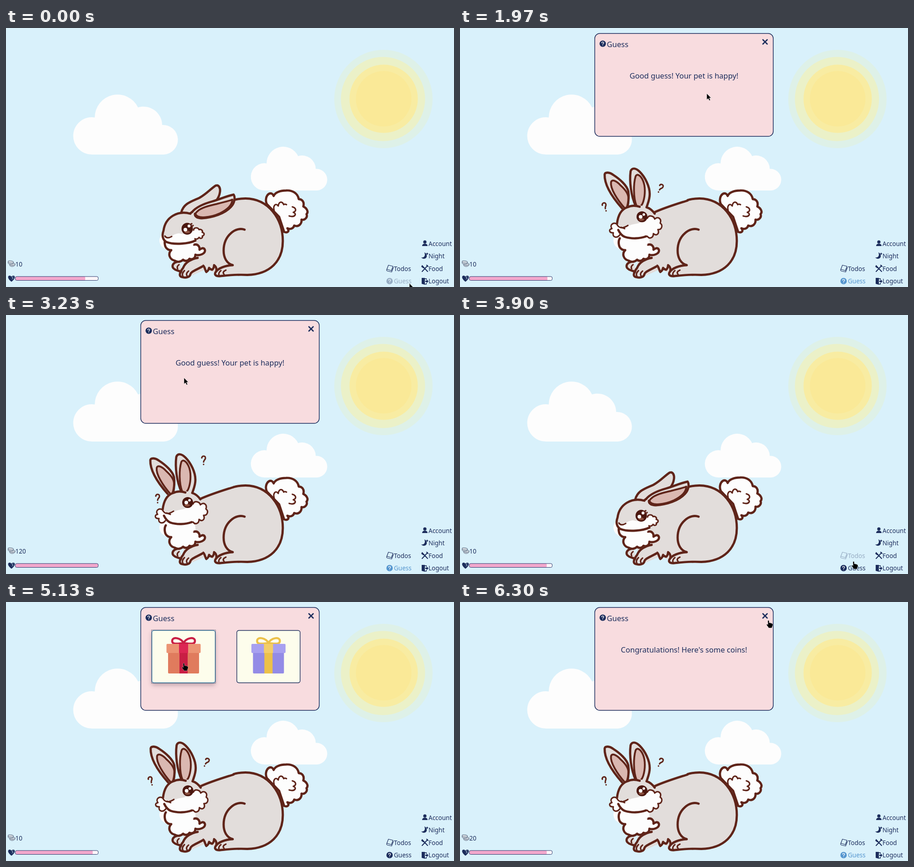
An HTML page that plays this animation: 984 by 569 pixels, repeating every 6.33 s.

```html
<!DOCTYPE html>
<html lang="en">
<head>
<meta charset="utf-8">
<title>Pet rabbit</title>
<style>
html, body { margin: 0; height: 100%; overflow: hidden; background: #d9f1fb; }
svg { display: block; width: 100vw; height: 100vh; }
text { font: 13.5px "Noto Sans", "Open Sans", sans-serif; fill: #1c2d5c; }
.big { font-size: 16.5px; }
.navy { fill: #1c2d5c; }
.line { fill: none; stroke: #1c2d5c; stroke-width: 1.5; stroke-linecap: round; stroke-linejoin: round; }
.pet path, #ask { fill: none; stroke: #5f2419; stroke-width: 4.9; stroke-linecap: round; stroke-linejoin: round; }
.pet .thin, #ask { stroke-width: 3.2; }
.pet .gray { fill: #e2dddb; }
.pet .white { fill: #fdfdfd; }
.pet .pink { fill: #dab8b1; stroke-width: 4; }
.pet .bare { stroke: none; }
.eye { fill: #4b170f; }
.spark { fill: #fdfdfd; }
.focus { fill: none; stroke: #59647c; stroke-width: .7; }
</style>
</head>
<body>
<svg viewBox="0 0 984 569" preserveAspectRatio="none">
  <defs>
    <path id="cloud" fill="#fdfdfd" d="M189 278a41 41 0 1 1 6-81.500a50 50 0 0 1 95-22a41 41 0 0 1 53 38.500a32.500 32.500 0 0 1 4 65z"/>
    <g id="badge">
      <circle r="7"/>
      <path d="M-2.200 -1.700C-2.200 -4.600 2.400 -4.600 2.200 -1.700C2 0 0 0 0 1.600M0 3.900v.1" fill="none" stroke="#fff" stroke-width="1.400" stroke-linecap="round"/>
    </g>
    <path id="ask" d="M-4 -5C-4 -10.500 5 -10.500 4 -4C3 0 0 0 0 4M0 9v.3"/>
    <filter id="shade" x="-20%" y="-20%" width="140%" height="150%">
      <feDropShadow dx="0" dy="5" stdDeviation="5" flood-color="#604050" flood-opacity=".35"/>
    </filter>
  </defs>

  <rect width="984" height="569" fill="#d9f1fb"/>
  <circle cx="829" cy="156" r="108" fill="#def1e8"/>
  <circle cx="828" cy="156" r="92.500" fill="#ebf1c8"/>
  <circle cx="829.500" cy="155.500" r="75" fill="#f8eca2"/>
  <circle cx="829.500" cy="155.500" r="61" fill="#fae997"/>
  <use href="#cloud"/>
  <use href="#cloud" transform="translate(430 154) scale(.73)"/>

  <g class="pet">
    <g id="tail">
      <path class="white" d="M573 387C569 379 571 368 578 364C582 362 586 364 588 369C591 361 603 357 615 357C629 356 641 363 643 376C650 376 656 382 653 392C661 396 665 404 660 409C663 415 657 423 649 421C650 430 643 438 633 434C631 441 624 443 618 440C623 446 619 451 611 448L600 415Z"/>
      <path class="thin" d="M589 401C586 391 592 383 598 391C599 382 606 379 610 388C612 386 614 387 616 388M629 393C637 395 639 402 631 405C639 407 636 417 622 413"/>
    </g>
    <ellipse cx="361" cy="467" rx="24" ry="21" fill="#fdfdfd"/>
    <path class="gray bare" d="M405 407C455 391 490 377 525 374C575 372 608 420 608 468C608 510 580 543 530 543C505 541 485 543 470 545L459 538L440 530L405 545L390 520L385 465Z"/>
    <path id="neck" d="M427 404C451 393 475 386 500 378"/>
    <path d="M500 378C510 375 518 374.500 526 374.500C577 375 608 420 608 468C608 512 580 541 530 542.500C505 541 490 543 471 545C462 546 457 543 460 537C466 527 482 522 498 521C486 518 478 506 478 489C478 455 506 436 524 443"/>
    <path class="thin" d="M470 545C465 542 468 536 472 533M479 541C475 538 478 534 483 532"/>
    <path d="M433 522C437 525 437 532 440 536C444 534 445 531 446 527C449 530 451 531 453 531C456 528 457 525 457 521C461 524 463 528 462 533"/>
    <path class="gray" d="M382 513C370 513 363 520 367 527C371 533 380 533 386 536"/>
    <path class="thin" d="M377 529C375 525 377 522 380 520"/>
    <path class="white bare" d="M351 470L408 455C417 460 418 470 414 478Z"/>
    <path class="white" d="M351 462C347 468 348 481 354 485C357 488 360 488 363 488C355 496 359 508 370 511C377 515 384 514 389 509C393 513 400 512 403 507C409 510 416 506 416 498C425 501 438 496 437 488C435 481 429 484 425 487C426 480 421 474 413 476"/>
    <path class="white bare" d="M356 466L410 462L412 476L355 480Z"/>
    <path class="gray bare" d="M420 508L402 514L390 527L383 547L405 542L434 522Z"/>
    <path d="M421 505C408 507 394 514 389 527C383 535 378 545 386 547C395 550 404 547 405 541C407 535 415 533 433 523"/>
    <path class="thin" d="M389 546C386 542 388 537 392 533M398 545C395 541 397 537 401 534"/>

    <g id="calm">
      <path class="gray" d="M385 405C390 386 405 382 425 373C440 365 452 351 461 346C468 344 471 352 470 360C468 375 458 386 445 390C428 396 412 399 403 409"/>
      <path class="gray bare" d="M407 408C380 398 350 415 346 445C342 456 344 465 352 470C370 477 402 474 416 467L432 458L440 430Z"/>
      <path class="white bare" d="M349 461C362 462 366 452 380 451C394 455 404 451 412 443L426 442L433 450L433 459L416 467C398 474 365 476 352 469Z"/>
      <path d="M405 408C378 400 350 415 346 445C342 456 344 465 352 470C370 477 402 474 416 467"/>
      <path class="thin white" d="M412 444C413 437 422 438 424 443C428 441 433 445 431 449C437 450 436 456 431 457C433 462 427 464 424 460C421 465 416 464 415 463"/>
      <path class="thin" d="M349 457C353 463 359 461 364 458"/>
      <ellipse class="eye" cx="398" cy="441" rx="12.500" ry="13"/>
      <path class="thin" d="M404 432L408 430M408 436L411 434"/>
      <ellipse cx="398" cy="448" rx="6" ry="3" fill="#8c5140"/>
      <circle class="spark" cx="402" cy="435" r="3.200"/>
      <circle class="spark" cx="394" cy="443" r="4"/>
      <path class="gray" d="M409 404C418 393 435 386 453 381C470 376 485 369 500 366C504 372 502 385 494 393C480 408 455 416 430 418C420 418 414 414 415 408"/>
      <path class="pink" d="M416 408C423 395 445 391 465 386C480 382 490 380 497 377C497 388 488 398 470 407C450 416 420 421 416 408Z"/>
    </g>

    <g id="curious">
      <path class="gray" d="M355 393C340 376 316 345 317 319C318 313 328 314 336 320C350 329 366 343 369 356C371 370 369 382 367 392"/>
      <path class="pink" d="M361 393C345 375 329 350 331 336C333 328 344 334 352 343C362 352 369 362 369 370C369 380 367 388 365 393"/>
      <path class="gray" d="M385 388C375 365 371 335 374 312C377 303 386 305 394 313C406 325 416 345 416 362C416 375 411 384 409 392"/>
      <path class="pink" d="M387 388C380 370 380 340 385 323C388 316 396 321 401 332C407 345 406 365 402 378C400 385 396 390 393 390"/>
      <path class="gray bare" d="M344 432C345 412 350 398 366 391C380 384 396 385 410 392L428 405L432 440L405 458L350 452Z"/>
      <path d="M344 428C346 410 352 396 367 391C375 387 385 387 394 390M409 391C416 393 422 398 427 405"/>
      <path class="white bare" d="M344 428L352 433C364 436 370 430 382 428C394 427 405 420 412 413L428 415L441 428L432 448L408 457C390 464 362 461 349 453L333 447L333 433Z"/>
      <path class="thin white" d="M344 428C336 423 327 430 333 438C325 439 327 448 336 447C333 457 344 460 350 452"/>
      <path class="thin white" d="M411 415C414 407 425 410 427 417C433 410 443 416 439 426C446 431 442 441 434 440C438 449 431 455 424 449C424 459 415 461 411 455"/>
      <path d="M347 441C350 447 354 453 361 456C376 461 394 460 408 455"/>
      <path class="thin" d="M344 429C350 439 358 437 368 431M353 435L361 438"/>
      <ellipse class="eye" cx="399" cy="412" rx="12" ry="12"/>
      <ellipse cx="398" cy="418" rx="6" ry="2.800" fill="#8c5140"/>
      <circle class="spark" cx="403" cy="407" r="2.800"/>
      <circle class="spark" cx="396" cy="412" r="4"/>
    </g>
    <g id="asks"><use href="#ask" id="ask1"/><use href="#ask" id="ask2"/></g>
  </g>

  <!-- Status -->
  <g fill="#cfd6dc" stroke="#62738b">
    <path d="M8 519v3c3 3 9 3 12-1v-3z"/>
    <ellipse cx="14" cy="519" rx="6" ry="2.600"/>
    <path d="M4.500 514v3c3 3 9 3 12 0v-3z"/>
    <ellipse cx="10.500" cy="514" rx="6" ry="2.600" transform="rotate(8 10.500 514)"/>
  </g>
  <text id="coins" x="20.500" y="524"></text>
  <path class="navy" d="M12 557.500C3 551 3 544 8 544C10 544 11 545 12 546.500C13 545 14 544 16 544C21 544 21 551 12 557.500Z"/>
  <path d="M16 545l-3 3.500l3 1l-3 3" fill="none" stroke="#d9f1fb" stroke-width=".8"/>
  <rect x="20.500" y="546" width="182" height="8.500" rx="3" fill="#fdf6fa"/>
  <rect id="bar" x="20.500" y="546" height="8.500" rx="2" fill="#f3a8cd"/>
  <rect x="20.500" y="546" width="182" height="8.500" rx="3" fill="none" stroke="#2a376b"/>

  <!-- Menu -->
  <g class="navy">
    <circle cx="920" cy="470" r="3.600"/>
    <path d="M914 479c0-7 12-7 12 0z"/>
    <path d="M919 493c3 8-1 12-7 11c5 6 14 2 12-5c-1-3-2-5-5-6zM925 493l1 2l2 1l-2 1l-1 2l-1-2l-2-1l2-1z"/>
    <path d="M913 549h7v15l-7-2zM920 550h4v3h-1.500v-1.500h-2.500zM920 562h2.500v-2h1.500v3.500h-4zM921 555h3v-2.500l4 4l-4 4v-2.500h-3z"/>
  </g>
  <path class="line" style="stroke-width:2" d="M914 522L926 535M926 522L914 535M913 524l4 3M924 521l3 3"/>
  <text x="928" y="479">Account</text>
  <text x="928" y="506">Night</text>
  <text x="928" y="534">Food</text>
  <text x="928" y="561">Logout</text>
  <g id="todos">
    <path class="line" style="stroke-width:1.200" d="M840 521L850 523.500L846.500 533L836.500 530ZM836.500 530Q835 533 838 534L847 536L851 526"/>
    <text x="852" y="534">Todos</text>
  </g>
  <g id="guess">
    <use href="#badge" class="navy" x="842.500" y="556"/>
    <text x="852" y="561">Guess</text>
  </g>

  <!-- Dialog -->
  <g id="dialog">
    <rect x="296" y="12" width="392" height="226" rx="11" fill="#f8dcdf" stroke="#1c2d5c" stroke-width="1.500"/>
    <use href="#badge" class="navy" x="313.500" y="34.500"/>
    <text class="big" x="322.500" y="42">Guess</text>
    <path class="line" style="stroke-width:2.600;stroke-linecap:butt" d="M664.500 25L675.500 36M675.500 25L664.500 36"/>
    <text class="big" id="note" x="492" y="111" text-anchor="middle"></text>
    <g id="gifts"></g>
    <rect id="ring" class="focus"/>
  </g>

  <g id="cursor">
    <path id="arrow" stroke="#fff" stroke-width=".5" d="M0 0V13.500L3.200 10.700L5.600 15.500L7.800 14.400L5.500 9.800H9.500Z"/>
    <path id="hand" stroke="#fff" stroke-width=".4" d="M-1 1C-1 -1 2 -1 2 1V5C4 4 5 5 5 5.500C7 5 8 6 8 6.500C10 6.500 10 7.500 10 8.500C10 12 8 13 8 16H1C0 13 -3 11 -3.500 9C-3 7 -1 8 -.5 9Z"/>
  </g>
</svg>
<script>
const LOOP = 6330;
const $ = id => document.getElementById(id);
const show = (id, on) => $(id).style.display = on ? '' : 'none';
const set = (id, attrs) => { for (const k in attrs) $(id).setAttribute(k, attrs[k]); };

const gift = (x, id, [box, lid, ribbon, band]) => `<g transform="translate(${x})">
  <rect id="${id}" x="320.500" y="62.500" width="139" height="115" rx="4.500" fill="#fdfdec" stroke-width="1.400"/>
  <path d="M390 90C384 79 366 75 365 85C364 95 380 91 390 90C400 91 416 95 415 85C414 75 396 79 390 90" fill="none" stroke="${ribbon}" stroke-width="4.500"/>
  <path d="M356 110h68v45q0 2-2 2h-64q-2 0-2-2z" fill="${box}"/>
  <path d="M381 110h18v47h-18z" fill="${ribbon}"/>
  <rect x="352.500" y="92" width="75" height="20" rx="2" fill="${lid}"/>
  <path d="M380 92h20v20h-20z" fill="${band}"/></g>`;
$('gifts').innerHTML =
  gift(0, 'left', ['#e07b5d', '#eb9473', '#c91e44', '#dc2653']) +
  gift(186.5, 'right', ['#938be6', '#a8a0f0', '#ecc14a', '#f3cd68']);

const HAPPY = 'Good guess! Your pet is happy!';
const LUCKY = "Congratulations! Here's some coins!";

// start, view, coins, right end of the bar
const scenes = [
  [0, 'idle', 10, 174], [290, 'pick', 10, 174], [1300, HAPPY, 10, 192], [2110, 'idle', 10, 192],
  [2180, 'idle', 120, 194], [2330, 'pick', 120, 194], [2950, HAPPY, 120, 202], [3740, 'idle', 120, 202],
  [3830, 'idle', 10, 190.5], [4180, 'pick', 10, 190.5], [5170, LUCKY, 20, 190.5]
];

// time, x, y of the pointer tip
const path = [
  [0, 886, 561], [120, 868, 556], [300, 868, 556], [650, 546, 146], [1300, 546, 146], [1330, 542, 144],
  [1970, 542, 144], [2080, 671, 33], [2179, 671, 33], [2180, 868, 556], [2340, 868, 556], [2530, 490, 174],
  [2700, 391, 138], [3450, 391, 138], [3650, 671, 33], [3829, 671, 33], [3830, 858, 520], [3900, 864, 542],
  [3980, 866, 556], [4200, 866, 556], [4650, 390, 135], [5900, 390, 135], [6250, 677, 41], [LOOP, 677, 41]
];

function pointer(t) {
  const i = path.findIndex(p => p[0] > t);
  const [t0, x0, y0] = path[i - 1], [t1, x1, y1] = path[i];
  const u = (t - t0) / (t1 - t0), k = u * u * (3 - 2 * u);
  return [x0 + (x1 - x0) * k, y0 + (y1 - y0) * k];
}

function draw(t) {
  const [, view, coins, end] = scenes.findLast(s => s[0] <= t);
  const [x, y] = pointer(t);
  const inside = (l, top, r, b) => x >= l && x <= r && y >= top && y <= b;
  const idle = view === 'idle', pick = view === 'pick';
  const up = Math.floor(t / 400 + .2) % 2 === 0;

  $('coins').textContent = coins;
  set('bar', { width: end - 20.5 });

  show('calm', idle);
  show('curious', !idle);
  show('neck', !idle);
  show('asks', !idle);
  set('curious', { transform: up ? '' : 'translate(.7 2.800)' });
  set('neck', { transform: up ? '' : 'translate(0 1)' });
  set('tail', { transform: !idle && up ? 'translate(0 1)' : '' });
  set('ask1', { transform: up ? 'translate(434 319)' : 'translate(440 352) rotate(26)' });
  set('ask2', { transform: up ? 'translate(333 403)' : 'translate(318 393) rotate(-18)' });

  const onTodos = idle && inside(836, 518, 890, 543);
  const onGuess = idle && inside(836, 543.1, 892, 569);
  $('todos').style.opacity = onTodos ? .35 : 1;
  $('guess').style.opacity = onGuess ? .35 : 1;
  for (const part of $('guess').children) part.style.fill = idle || pick ? '' : '#5596cf';

  show('dialog', !idle);
  show('gifts', pick);
  $('note').textContent = idle || pick ? '' : view;
  const hover = {
    left: pick && inside(320, 62, 460, 178),
    right: pick && inside(507, 62, 647, 178)
  };
  for (const id in hover) {
    set(id, { stroke: hover[id] ? '#37749f' : '#1c2d5c', filter: hover[id] ? 'url(#shade)' : 'none' });
  }
  show('ring', pick);
  set('ring', t > 5100
    ? { x: 319.5, y: 61.5, width: 141, height: 117 }
    : { x: 295.5, y: 11.5, width: 394, height: 228 });

  const onClose = !idle && inside(660, 20, 682, 42);
  const hand = hover.left || hover.right || onClose || ((onTodos || onGuess) && x < 884);
  show('hand', hand);
  show('arrow', !hand);
  set('cursor', { transform: `translate(${x} ${y})` });
}

function tick() {
  draw(performance.now() % LOOP);
  requestAnimationFrame(tick);
}
tick();
</script>
</body>
</html>
```
